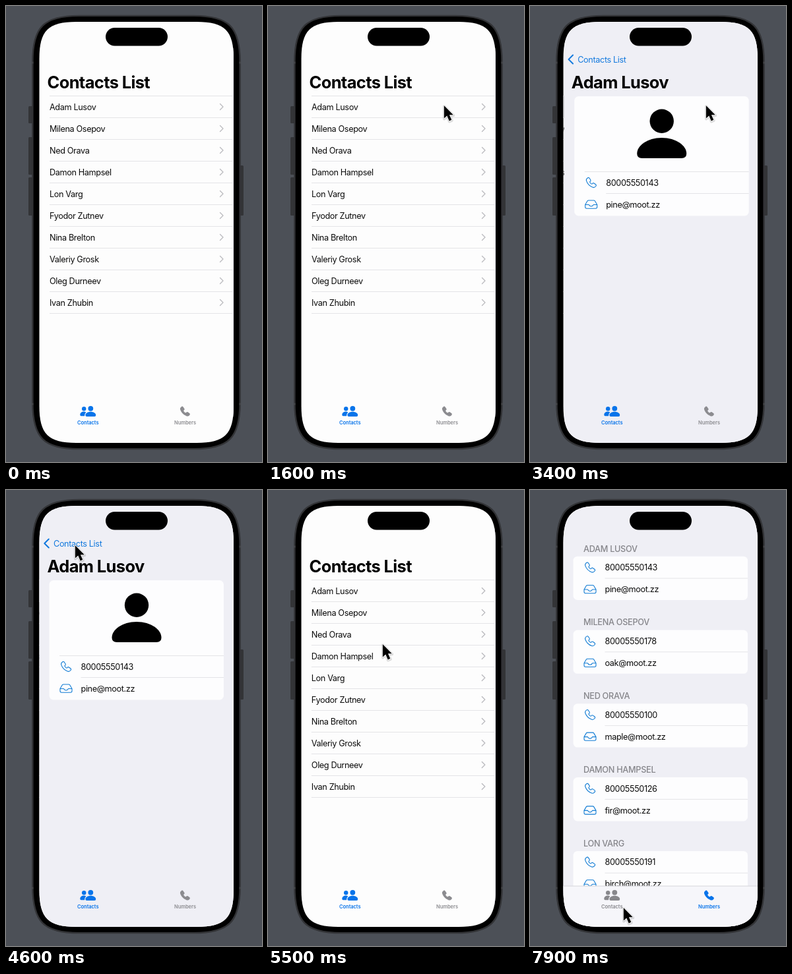
These frames come from a looping animation (388 px wide and 692 px high, 8 s). An HTML page:

```html
<!DOCTYPE html>
<html lang="en">
<head>
<meta charset="utf-8">
<style>
html, body { margin: 0; width: 100%; height: 100%; overflow: hidden; background: #4c5057; }
svg { display: block; width: 388px; height: 692px; }
text { font: 12.7px Inter, "Liberation Sans", sans-serif; letter-spacing: -.38px; fill: #0c0c0c; }
.title { font-size: 25.4px; font-weight: 700; letter-spacing: -.6px; fill: #000; }
.head { font-weight: 500; fill: #85858a; letter-spacing: -.3px; }
.back { fill: #1279de; }
.tab { font-size: 7.5px; font-weight: 600; letter-spacing: -.05px; text-anchor: middle; fill: inherit; }
.icon, .chev, .tray { fill: none; stroke: #127cd4; stroke-width: 1.1; stroke-linejoin: round; stroke-linecap: round; }
.chev { stroke: #bcbcc0; stroke-width: 1.4; }
.line { stroke: #e4e4e7; }
</style>
</head>
<body>
<svg viewBox="0 0 388 692">
  <defs>
    <clipPath id="screen"><path id="glass"/></clipPath>
    <path id="phone" d="M-5.2-7.2C-4.3-7.9-3.3-7.6-2.7-6.8L-1-4.3C-.5-3.5-.6-2.8-1.2-2.2L-2.1-1.2C-2.6-.6 .6 2.6 1.2 2.1L2.2 1.2C2.8 .6 3.5 .5 4.3 1L6.8 2.7C7.6 3.3 7.9 4.3 7.2 5.2C6 7 4.4 7.8 2.6 7.2C-2 5.6-5.6 2-7.2-2.6C-7.8-4.4-7-6-5.2-7.2Z"/>
    <path id="tray" d="M-9 .5L-5.8-5Q-5.2-6-4-6H4Q5.2-6 5.8-5L9 .5V4Q9 6.2 6.8 6.2H-6.8Q-9 6.2-9 4ZH-3.6C-3 .5-3 3 0 3S3 .5 3.6 .5H9"/>
  </defs>

  <!-- phone body -->
  <g fill="#333437">
    <rect x="34" y="152" width="7" height="26" rx="1.5"/>
    <rect x="34" y="199" width="7" height="57" rx="1.5"/>
    <rect x="34" y="260" width="7" height="58" rx="1.5"/>
    <rect x="354" y="242" width="6" height="76" rx="1.5"/>
  </g>
  <path id="body" stroke="#323336" stroke-width="2.4"/>
  <path d="M39 86h2.5m312 0h2.5M39 604h2.5m312 0h2.5" stroke="#434447" stroke-width="3"/>

  <g clip-path="url(#screen)">
    <g id="nav">
      <rect x="50" y="24" width="296" height="640" fill="#fdfdfd"/>
      <g id="list"></g>
      <rect id="dim" x="50" y="24" width="296" height="640"/>
      <g id="detail"></g>
      <g id="listTitle"><text class="title" x="62.5" y="125">Contacts List</text></g>
      <g id="name"></g>
      <g id="back">
        <path d="M64.8 74.5L58.3 81L64.8 87.5" fill="none" stroke="#1279de" stroke-width="2" stroke-linecap="round" stroke-linejoin="round"/>
        <text class="back" x="72" y="85.6">Contacts List</text>
      </g>
    </g>
    <g id="numbers"></g>
    <g id="tabA">
      <circle cx="118.2" cy="611.3" r="3.2"/>
      <path d="M112.3 620.5C112.3 617.5 115 615.6 118 615.6Q120 615.6 121.3 616.6Q119 618.8 119 622.2H113.8Q112.3 622.2 112.3 620.5Z"/>
      <circle cx="128.3" cy="610.8" r="3.9"/>
      <path d="M120.4 621C120.4 618 124 615.8 128.3 615.8S136.2 618 136.2 621Q136.2 623 134.2 623H122.4Q120.4 623 120.4 621Z"/>
      <text class="tab" x="124.3" y="634.8">Contacts</text>
    </g>
    <g id="tabB">
      <use href="#phone" x="271.3" y="615.2"/>
      <text class="tab" x="271.5" y="634.8">Numbers</text>
    </g>
  </g>
  <rect x="151" y="33" width="94" height="27.5" rx="13.7"/>

  <g id="cursor">
    <path d="M1 3V22.4L5.5 18.4L8.9 26.4L12.7 24.8L9.3 17.2H15.2Z" fill="none" stroke="#000" stroke-opacity=".13" stroke-width="4" stroke-linejoin="round"/>
    <path d="M.8 2V21.4L5.3 17.4L8.7 25.4L12.3 23.8L8.9 16.2H14.8Z" stroke="#fff" stroke-width="1.6" stroke-linejoin="round" paint-order="stroke"/>
  </g>
</svg>
<script>
const people = ["Adam Lusov", "Milena Osepov", "Ned Orava", "Damon Hampsel", "Lon Varg",
  "Fyodor Zutnev", "Nina Brelton", "Valeriy Grosk", "Oleg Durneev", "Ivan Zhubin"];
const phones = ["80005550143", "80005550178", "80005550100", "80005550126", "80005550191"];
const mails = ["pine", "oak", "maple", "fir", "birch"].map(box => box + "@moot.zz");
const $ = id => document.getElementById(id);
const set = (id, attrs) => {
  for (const k in attrs) $(id).setAttribute(k, attrs[k]);
};

// Rectangle with continuous-curvature corners of reach r
function smoothRect(x, y, w, h, r) {
  const c = .76 * r, d = r - c, m = w - 2 * r, n = h - 2 * r;
  return `M${x + r} ${y}h${m}c${c} 0 ${r} ${d} ${r} ${r}v${n}c0 ${c} ${-d} ${r} ${-r} ${r}` +
    `h${-m}c${-c} 0 ${-r} ${-d} ${-r} ${-r}v${-n}c0 ${-c} ${d} ${-r} ${r} ${-r}z`;
}
set("glass", { d: smoothRect(50.5, 24, 294.5, 639, 56) });
set("body", { d: smoothRect(40.4, 14.9, 314.2, 657.2, 70) });

const text = (x, mid, str, cls = "") => `<text class="${cls}" x="${x}" y="${mid + 4.6}">${str}</text>`;
const line = (x1, x2, y) => `<path class="line" d="M${x1} ${y}H${x2}"/>`;
const card = (y, h) => `<rect x="65.5" y="${y}" width="264.5" height="${h}" rx="6.5" fill="#fdfdfe"/>`;
const page = '<rect x="50" y="24" width="296" height="640" fill="#efeff5"/>';
// Phone row and mail row, 33px apart
const entry = (i, mid) =>
  `<use class="icon" href="#phone" x="91" y="${mid}"/>` + text(113.5, mid, phones[i]) +
  line(113.5, 330, mid + 16.5) +
  `<use class="tray" href="#tray" x="91" y="${mid + 33}"/>` + text(113.5, mid + 33, mails[i]);

$("list").innerHTML =
  '<rect id="pressed" x="50" y="136.5" width="296" height="33" fill="#d3d3d7"/>' + line(66, 345, 136.5) +
  people.map((name, i) => {
    const mid = 153 + 33 * i;
    return text(66, mid, name) + line(66, 345, mid + 16.5) +
      `<path class="chev" d="M324.5 ${mid - 4.5}L329 ${mid}L324.5 ${mid + 4.5}"/>`;
  }).join("");

$("detail").innerHTML = page + card(137, 181.5) +
  '<circle cx="198" cy="174.7" r="18.2"/>' +
  '<path d="M160.5 224C160.5 212 176 200 198 200S235.5 212 235.5 224Q235.5 231 228 231H168Q160.5 231 160.5 224Z"/>' +
  line(81, 330, 251.5) + entry(0, 268);
$("name").innerHTML = `<text class="title" x="62.5" y="125">${people[0]}</text>`;

$("numbers").innerHTML = page + phones.map((_, i) => {
  const y = 111.8 * i;
  return text(81, 89 + y, people[i].toUpperCase(), "head") + card(100.7 + y, 66.3) + entry(i, 117.5 + y);
}).join("") +
  '<rect x="50" y="601" width="296" height="63" fill="#f6f6fa"/><path d="M50 601H346" stroke="#d6d6da"/>';

// Cursor path: time, x, y
const path = [
  [300, 96, 636], [500, 148, 548], [700, 215, 462], [800, 240, 342], [900, 262, 204],
  [1000, 280, 122], [1200, 272, 138], [1300, 266, 149], [3800, 266, 149],
  [4100, 210, 128], [4400, 86, 84], [4600, 104, 82], [5100, 104, 82],
  [5500, 173, 232], [5800, 235, 450], [6000, 278, 630], [6200, 272, 620], [7100, 272, 620],
  [7500, 190, 643], [7700, 117, 640], [7900, 141, 632], [8000, 141, 632]
];
function cursorAt(t) {
  const i = Math.max(1, path.findIndex(k => k[0] > t));
  const [a, x, y] = path[i - 1], [b, u, v] = path[i];
  const f = (t - a) / (b - a);
  return `translate(${x + (u - x) * f} ${y + (v - y) * f})`;
}

// Critically damped spring, remaining distance 1 to 0
const spring = ms => {
  const w = Math.max(0, ms) * .0165;
  return (1 + w) * Math.exp(-w);
};

function draw(t) {
  const pushing = t >= 3000 && t < 5000;
  const p = t < 3000 ? 0 : pushing ? 1 - spring(t - 2960) : spring(t - 4985);
  const rest = 1 - p;
  const onNumbers = t >= 6500;
  set("list", { transform: `translate(${-98 * p} 0)` });
  set("pressed", { opacity: pushing ? 1 : p });
  set("dim", { opacity: .07 * p });
  set("detail", { transform: `translate(${294 * rest} 0)` });
  set("name", { transform: `translate(${294 * rest ** 1.3} 0)`, opacity: p });
  set("listTitle", {
    transform: `translate(${41 * p} ${23 * p}) scale(${1 - .5 * p})`,
    opacity: Math.max(0, 1 - 2 * p)
  });
  set("back", { transform: `translate(${40 * rest} 0)`, opacity: Math.max(0, 2 * p - 1) });
  set("numbers", { visibility: onNumbers ? "visible" : "hidden" });
  set("tabA", { fill: onNumbers ? "#88888c" : "#0874ea" });
  set("tabB", { fill: onNumbers ? "#0874ea" : "#8c8c90" });
  set("cursor", { transform: cursorAt(t), visibility: t < 300 ? "hidden" : "visible" });
}

// Ten pictures a second, as in a screen recording
const start = performance.now();
function tick() {
  draw(Math.floor((performance.now() - start) % 8000 / 100) * 100);
  requestAnimationFrame(tick);
}
tick();
</script>
</body>
</html>
```
